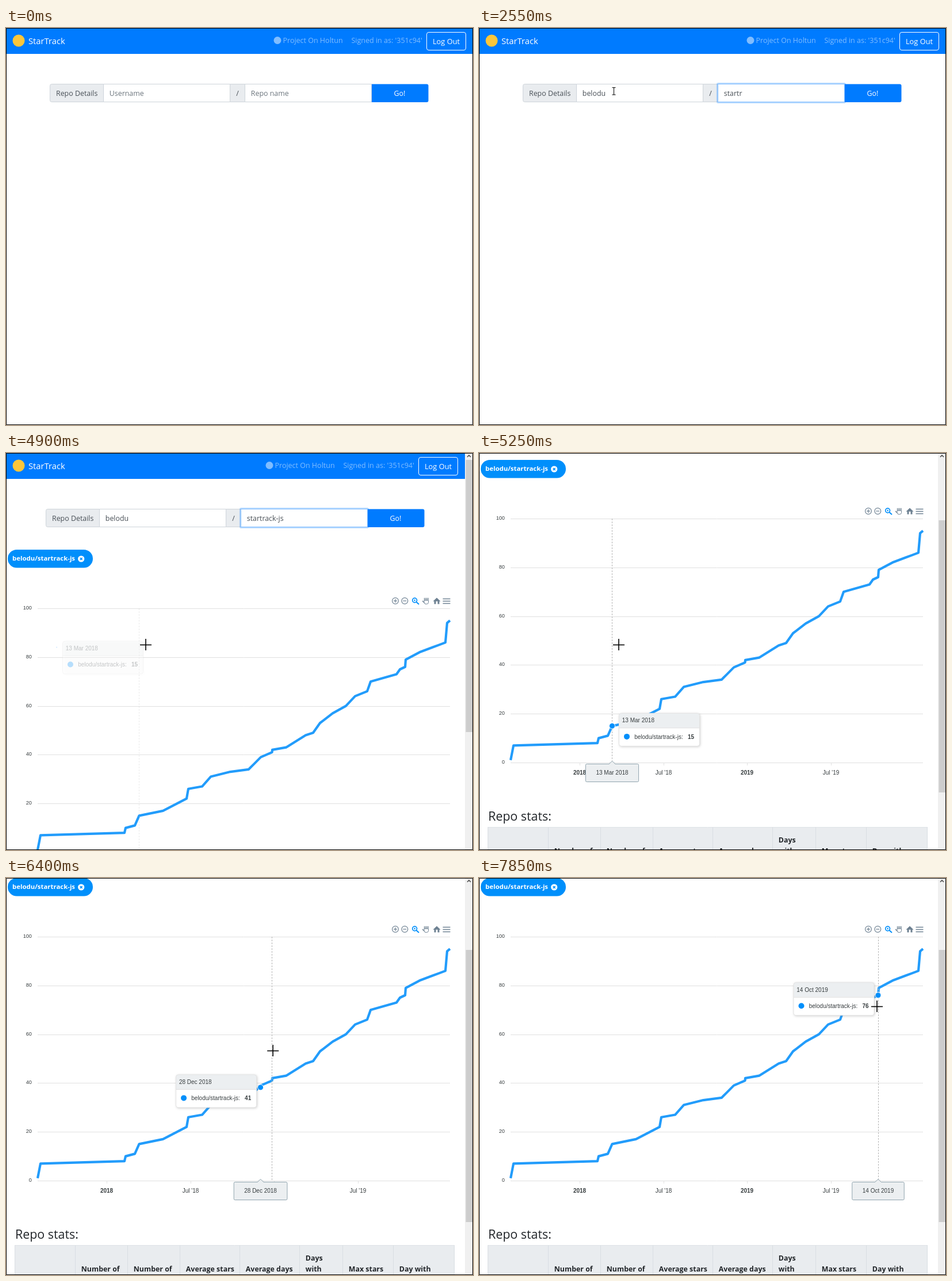
An HTML page with a canvas for the animation above (8 s loop, 812 by 690 pixels).

```html
<!DOCTYPE html>
<html lang="en">
<head>
<meta charset="utf-8">
<title>StarTrack</title>
<style>
html, body { margin: 0; width: 100%; height: 100%; overflow: hidden; background: #fff; }
canvas { display: block; }
</style>
</head>
<body>
<canvas id="stage" width="812" height="690"></canvas>
<script>
const ctx = document.getElementById('stage').getContext('2d');
const LOOP = 8000, W = 812, H = 690, TAU = Math.PI * 2;
const USER = 'belodu', REPO = 'startrack-js', FULL = USER + '/' + REPO;
const UI = '"Open Sans", "Noto Sans", sans-serif';
const PLOT = '"Liberation Sans", Arial, sans-serif';
const BLUE = '#007bff', SERIES = '#008ffb', INK = '#373d3f';
const LEFT = 55, RIGHT = 772, ZERO = 694, TOP = 270, STEP = (ZERO - TOP) / 100;
const NEW_YEAR = 175, DAY = .7973;

// key moments and typing pace in ms
const SUBMIT = 3500, LOADED = 3950, DRAWN = 4400, HOVER = 4865;
const USER_AT = 850, USER_PACE = 90, REPO_AT = 1850, REPO_PACE = 136;
const LAG = 115;

// turning points of the curve: x, star count
const turns = [
  [55, 1], [60, 7], [206, 8], [208, 10], [224, 11], [231.5, 15], [273, 17], [314, 22], [317, 26],
  [341, 27], [356, 31], [390, 33], [422, 34], [443, 39], [462.6, 41], [463, 42], [487, 43],
  [521, 48], [534, 49], [546, 53], [568, 57], [591, 60], [607, 64], [628, 66], [634, 70],
  [679, 73], [685, 75], [694, 76], [695, 79], [719, 82], [764, 86], [767, 94], [772, 95]
];

// one point per star, evenly spread between turns
const points = [];
turns.forEach(([x, n], i) => {
  const [x0, n0] = turns[i - 1] || [x, n - 1];
  for (let k = n0 + 1; k <= n; k++) {
    points.push({ x: lerp(x0, x, (k - n0) / (n - n0)), y: ZERO - k * STEP, n: k });
  }
});

// pointer stops: time, x, y
const path = [
  [50, 695, 680], [600, 234, 110], [4760, 234, 110], [4880, 243, 333], [5300, 243, 333],
  [5520, 204, 343], [5640, 204, 343], [6400, 464, 300], [7300, 659, 238], [7680, 692, 223]
];

function lerp(a, b, p) { return a + (b - a) * p; }
const span = (t, a, b) => Math.max(0, Math.min(1, (t - a) / (b - a)));
const smooth = p => p * p * (3 - 2 * p);

function pointer(t) {
  const i = path.findIndex(stop => t <= stop[0]);
  const [t1, x1, y1] = path.at(i), [t0, x0, y0] = path.at(i > 0 ? i - 1 : i);
  const p = t1 > t0 ? span(t, t0, t1) : 1;
  return { x: lerp(x0, x1, p), y: lerp(y0, y1, p) };
}

function text(s, x, y, size, color, { align = 'left', weight = 400, font = UI } = {}) {
  ctx.font = `${weight} ${size}px ${font}`;
  ctx.textAlign = align;
  ctx.fillStyle = color;
  ctx.fillText(s, x, y);
}

function paint(fill, stroke, lw = 1) {
  if (fill) { ctx.fillStyle = fill; ctx.fill(); }
  if (stroke) { ctx.strokeStyle = stroke; ctx.lineWidth = lw; ctx.stroke(); }
}

function rect(x, y, w, h, fill) {
  ctx.fillStyle = fill;
  ctx.fillRect(x, y, w, h);
}

function box(x, y, w, h, r, fill, stroke, lw) {
  ctx.beginPath();
  ctx.roundRect(x, y, w, h, r);
  paint(fill, stroke, lw);
}

function disc(x, y, r, fill, stroke, lw) {
  ctx.beginPath();
  ctx.arc(x, y, r, 0, TAU);
  paint(fill, stroke, lw);
}

function shape(pts, fill, stroke, lw) {
  ctx.beginPath();
  pts.forEach(([x, y]) => ctx.lineTo(x, y));
  paint(fill, stroke, lw);
}

const line = (pts, color, lw) => shape(pts, null, color, lw);
const hline = (x, y, r, color, lw) => line([[x - r, y], [x + r, y]], color, lw);
const vline = (x, y, r, color, lw) => line([[x, y - r], [x, y + r]], color, lw);

function navbar(shift) {
  const soft = 'rgba(255,255,255,.5)';
  rect(0, 0, W, 45, BLUE);
  disc(22, 22, 10.5, '#fcc63a');
  text('StarTrack', 39, 27.7, 14.8, '#fff');
  disc(472 - shift, 21.5, 6.5, soft);
  text('Project On Holtun', 481.5 - shift, 26.3, 12.5, soft);
  text("Signed in as: '351c94'", 600.5 - shift, 26.3, 12.5, soft);
  box(731.5 - shift, 7.5, 68, 31, 3.5, null, '#fff');
  text('Log Out', 765.5 - shift, 28, 12.8, '#fff', { align: 'center' });
}

function field(x, w, value, hint, focus) {
  box(x, 97.5, w, 31, 0, '#fff', '#ced4da');
  ctx.globalAlpha = focus;
  box(x - 1.2, 96.3, w + 2.4, 33.4, 2, null, 'rgba(0,123,255,.27)', 2.8);
  box(x, 97.5, w, 31, 0, null, '#80bdff');
  ctx.globalAlpha = 1;
  text(value || hint, x + 10.3, 118, 12.4, value ? '#495057' : '#6c757d');
}

function typed(s, t, from, pace) {
  return s.slice(0, Math.max(0, Math.floor((t - from) / pace) + 1));
}

function loadingButtons(x, t) {
  const turn = (t - 3800) / 750 * TAU;
  box(x, 97.5, 98.5, 31.5, 0, '#59a9ff');
  ctx.beginPath();
  ctx.arc(622, 115, 5.6, turn - TAU / 8, turn + TAU * 5 / 8);
  paint(null, '#fff', 2.5);
  text('Loading...', 631.5, 118, 12.4, '#fff');
  box(701, 97.5, 33, 31.5, [0, 3, 3, 0], '#e01b24');
  disc(718, 113.5, 6.5, '#fff');
  rect(715.5, 111, 5, 5, '#e01b24');
}

function form(t, shift) {
  const busy = t >= SUBMIT && t < LOADED;
  const w = busy ? 203.7 : 220;
  const slash = 169.5 + w, repo = slash + 26, end = repo + w;
  const swap = span(t, 1450, 1600);
  ctx.save();
  ctx.translate(-shift, 0);
  box(76.5, 97.5, 93, 31, [3, 0, 0, 3], '#e9ecef', '#ced4da');
  text('Repo Details', 87, 118, 12.4, '#495057');
  box(slash, 97.5, 26, 31, 0, '#e9ecef', '#ced4da');
  text('/', slash + 13, 118, 12.4, '#495057', { align: 'center' });
  if (busy) loadingButtons(end, t);
  else {
    box(end - .5, 97.5, 99.5, 31.5, [0, 3, 3, 0], BLUE);
    text('Go!', 684.5, 118, 12.4, '#fff', { align: 'center' });
  }
  field(169.5, w, typed(USER, t, USER_AT, USER_PACE), 'Username', span(t, 450, 600) * (1 - swap));
  field(repo, w, typed(REPO, t, REPO_AT, REPO_PACE), 'Repo name', swap);
  if (t >= 4050 && t < 4550) rect(489, 105, 1, 17, '#495057');
  ctx.restore();
}

function toolbar() {
  const c = '#6e8192', y = 257;
  for (const x of [677, 693.3]) {
    disc(x, y, 5.4, null, c, 1.2);
    hline(x, y, 3, c, 1.2);
  }
  vline(677, y, 3, c, 1.2);
  disc(710.6, y - 1, 3.9, null, SERIES, 1.7);
  hline(710.6, y - 1, 1.6, SERIES);
  vline(710.6, y - 1, 1.6, SERIES);
  line([[713.5, y + 2], [718, y + 6]], SERIES, 2);
  box(727, y - 1, 7.5, 6.5, [0, 1, 3, 3], null, c);
  for (let i = 0; i < 4; i++) vline(727.5 + i * 2.2, y - 3, 2.2, c, 1.2);
  line([[727, y + 3], [724, y]], c, 1.4);
  shape([[742.5, y + .8], [749, y - 5.5], [755.5, y + .8]], c);
  for (const x of [744.5, 750.5]) rect(x, y, 3, 5.5, c);
  for (let i = -1; i < 2; i++) hline(766, y + .5 + i * 4, 6.5, c, 1.5);
}

function badge() {
  box(3, 168, 148, 31.5, 15.75, SERIES);
  text(FULL, 11, 187.3, 11.4, '#fff', { weight: 700 });
  disc(130.7, 184, 5.6, '#fff');
  for (const d of [-2, 2]) line([[130.7 - d, 182], [130.7 + d, 186]], SERIES, 1.6);
}

function chart(t) {
  for (let n = 0; n <= 100; n += 20) {
    const y = Math.round(ZERO - n * STEP);
    line([[LEFT, y + .5], [RIGHT, y + .5]], '#e0e0e0');
    text(n, 44.7, y + 2, 9, INK, { align: 'right', font: PLOT });
  }
  ['2018', "Jul '18", '2019', "Jul '19"].forEach((s, i) => {
    const x = Math.round(NEW_YEAR + DAY * 365 * i / 2);
    vline(x + .5, ZERO + 2.5, 2.5, '#e0e0e0');
    text(s, x, 715.3, 10, INK, { align: 'center', font: PLOT, weight: i % 2 ? 400 : 700 });
  });
  const grow = smooth(span(t, LOADED, DRAWN));
  ctx.lineJoin = 'round';
  line(points.map(p => [lerp(LEFT, p.x, grow), lerp(ZERO, p.y, grow)]), '#229cfb', 4.2);
}

function table() {
  const cols = [['', 105], ['Number of', 91], ['Number of', 91], ['Average stars', 104],
    ['Average days', 104], ['with', 75], ['Max stars', 88], ['Day with', 106]];
  const bold = { weight: 700 };
  text('Repo stats:', 16, 795, 21.4, '#212529');
  rect(15.5, 807, 764, 100, '#e9ecef');
  line([[15.5, 806.5], [779.5, 806.5]], '#dee2e6');
  let x = 15.5;
  for (const [head, w] of cols) {
    vline(x, 856, 50, '#d9dee3');
    text(head, x + 10.3, 852, 12.4, '#212529', bold);
    if (head === 'with') text('Days', x + 10.3, 832.5, 12.4, '#212529', bold);
    x += w;
  }
  vline(x, 856, 50, '#d9dee3');
}

function nearest(t) {
  const x = pointer(t).x - 2;
  return points.reduce((a, b) => Math.abs(b.x - x) < Math.abs(a.x - x) ? b : a);
}

const tipWidth = p => p.n < 10 ? 134 : 140;

// where the tip settles for the point under the pointer
function rest(t) {
  const p = nearest(t);
  const flip = pointer(t).x > (LEFT + RIGHT) / 2;
  return { x: p.x, y: p.y, left: flip ? p.x - tipWidth(p) - 7 : p.x + 12, top: Math.min(p.y - 22, ZERO - 56) };
}

// a trailing mean gives the eased lag
function trail(t) {
  const sum = { x: 0, y: 0, left: 0, top: 0 }, N = 30;
  for (let i = 0; i < N; i++) {
    const r = rest(Math.max(HOVER + 15, t - LAG * i / (N - 1)));
    for (const k in sum) sum[k] += r[k] / N;
  }
  return sum;
}

function hover(t) {
  if (t < HOVER) return;
  const p = nearest(t), m = trail(t), w = tipWidth(p);
  const show = span(t, HOVER, HOVER + 130), go = smooth(show);
  const x = lerp(LEFT, m.x, go), y = lerp(TOP, m.y, go);
  const left = lerp(65, m.left, go), top = lerp(TOP - 8, m.top, go);
  const day = new Date(2018, 0, 1 + Math.round((p.x - NEW_YEAR) / DAY));
  const month = day.toLocaleString('en-US', { month: 'short' });
  const date = `${String(day.getDate()).padStart(2, '0')} ${month} ${day.getFullYear()}`;

  ctx.globalAlpha = show;
  ctx.setLineDash([3, 2]);
  vline(Math.floor(p.x) + .5, (TOP + ZERO) / 2, (ZERO - TOP) / 2, '#b6b6b6');
  ctx.setLineDash([]);
  disc(x, y, 5 * go, SERIES, '#fff');

  ctx.save();
  ctx.shadowColor = `rgba(120,120,120,${.4 * show})`;
  ctx.shadowBlur = 4;
  ctx.shadowOffsetX = ctx.shadowOffsetY = 1;
  box(left, top, w, 57, 4, '#fff');
  ctx.restore();
  box(left, top, w, 25, [4, 4, 0, 0], '#eceff1');
  line([[left, top + 25.5], [left + w, top + 25.5]], '#ddd');
  box(left, top, w, 57, 4, null, '#e3e3e3');
  text(date, left + 5.3, top + 16, 10, INK, { font: PLOT });
  disc(left + 13.5, top + 40.5, 5, SERIES);
  text(FULL + ':', left + 26.7, top + 44.3, 10, INK, { font: PLOT });
  text(p.n, left + 119.5, top + 44.3, 10, INK, { font: PLOT, weight: 700 });

  ctx.font = `10px ${PLOT}`;
  const half = ctx.measureText(date).width / 2 + 18, base = ZERO + 2.5;
  box(x - half, base, half * 2, 31, 2, '#eceff1', '#90a4ae');
  rect(x - 5, base - 1, 10, 2, '#eceff1');
  shape([[x - 5.5, base], [x, base - 5], [x + 5.5, base]], '#eceff1', '#90a4ae');
  text(date, x, 715.3, 10, INK, { font: PLOT, align: 'center' });
  ctx.globalAlpha = 1;
}

function scrollbar(scroll) {
  rect(798, 0, 14, H, '#f0f0f0');
  rect(799.5, 12 + scroll * 113 / 168, 11.5, 473, '#cdcdcd');
  line([[802, 7], [805, 4], [808, 7]], '#505050', 1.6);
}

function cursor(t) {
  if (t < 50) return;
  const { x, y } = pointer(t);
  if (t >= HOVER) {
    hline(x, y + .5, 10, '#000', 1.6);
    vline(x, y, 10, '#000', 1.6);
  } else if (y < 129) {
    vline(x + .5, y, 6, '#222', 1.2);
    for (const d of [-6.5, 6]) hline(x + .5, y + d, 3, '#222', 1.2);
  } else {
    shape([[x, y], [x, y + 15], [x + 4, y + 11], [x + 10.5, y + 11], [x, y]], '#fff', '#000');
  }
}

function draw(t) {
  const ready = t >= LOADED;
  const scroll = Math.round(168 * smooth(span(t, 5000, 5300)));
  rect(0, 0, W, H, '#fff');
  ctx.save();
  ctx.translate(0, -scroll);
  navbar(ready ? 14 : 0);
  if (t >= SUBMIT && !ready) rect(0, 45, W, 13, '#e9ecef');
  form(t, ready ? 7 : 0);
  if (ready) {
    badge();
    toolbar();
    chart(t);
    table();
    hover(t);
  }
  ctx.restore();
  if (ready) scrollbar(scroll);
  cursor(t);
  box(.5, .5, W - 1, H - 1, 0, null, '#000');
}

const start = performance.now();
function tick() {
  draw((performance.now() - start) % LOOP);
  requestAnimationFrame(tick);
}
tick();
</script>
</body>
</html>
```
